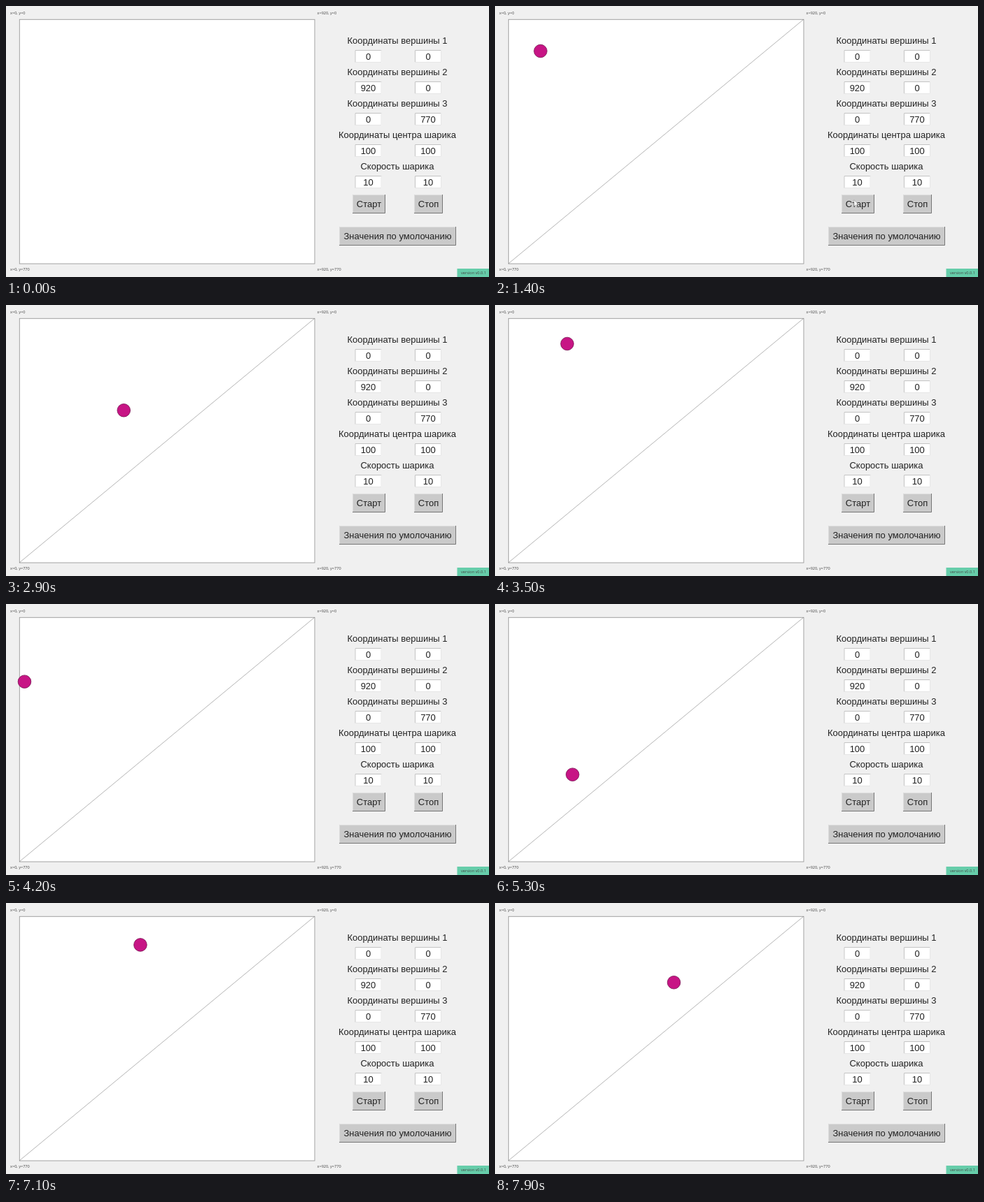
Write an HTML page that moves like this. It is 690x388 px and loops after 8000 ms.

```html
<!DOCTYPE html>
<html lang="ru">
<head>
<meta charset="utf-8">
<style>
  html, body { margin: 0; width: 100%; height: 100%; overflow: hidden; background: #f0f0f0; }
  svg { display: block; }
  text { font: 13px "Liberation Sans", Arial, sans-serif; fill: #222; text-anchor: middle; }
  .small { font: 5.6px "Open Sans", sans-serif; fill: #444; text-anchor: start; }
</style>
</head>
<body>
<svg width="690" height="388" viewBox="0 0 690 388">
  <rect width="690" height="388" fill="#f0f0f0"/>
  <rect x="19.3" y="19.3" width="421.7" height="349.7" fill="#fff" stroke="#999" stroke-width=".9"/>
  <g id="panel"></g>
  <rect x="644.5" y="376" width="46" height="12" fill="#66cdaa"/>
  <text class="small" x="650" y="384">version v0.0.1</text>
  <g id="scene">
    <path d="M441 19L19 369" stroke="#777" stroke-width=".55"/>
    <circle id="ball" r="9.3" fill="#c71585" stroke="#761050" stroke-width=".8"/>
  </g>
  <path id="cursor" d="M513 277.5v9l2-1.8 1.4 3 1.2-.6-1.3-2.8h2.4z" fill="#fff" stroke="#888" stroke-width=".5"/>
</svg>
<script>
const $ = id => document.getElementById(id);
const parts = [];
const text = (s, x, y, cls = "") => parts.push(`<text class="${cls}" x="${x}" y="${y}">${s}</text>`);

// Bevelled box: fill, then top-left and bottom-right edges
function box(x, y, w, h, fill, topLeft, bottomRight) {
  parts.push(`<rect x="${x}" y="${y}" width="${w}" height="${h}" fill="${fill}"/>
    <path d="M${x + .5} ${y + h}V${y + .5}H${x + w}" fill="none" stroke="${topLeft}"/>
    <path d="M${x} ${y + h - .5}H${x + w - .5}V${y}" fill="none" stroke="${bottomRight}"/>`);
}

function button(label, x, y, w) {
  box(x, y, w, 27, "#cacaca", "#dedede", "#777");
  text(label, x + w / 2, y + 18);
}

[
  ["Координаты вершины 1", 0, 0],
  ["Координаты вершины 2", 920, 0],
  ["Координаты вершины 3", 0, 770],
  ["Координаты центра шарика", 100, 100],
  ["Скорость шарика", 10, 10],
].forEach(([label, ...values], row) => {
  const y = 45 * row;
  text(label, 559, y + 54);
  values.forEach((value, column) => {
    const x = 517.5 + 85.5 * column;
    box(x - 19, y + 63, 38, 18, "#fff", "#c4c4c4", "#e6e6e6");
    text(value, x, y + 76.5);
  });
});

button("Старт", 495, 270, 47);
button("Стоп", 583, 270, 41);
button("Значения по умолочанию", 476, 316, 167);

for (const [px, x] of [[6, 0], [444.5, 920]])
  for (const [py, y] of [[12, 0], [379, 770]]) text(`x=${x}, y=${y}`, px, py, "small");

$("panel").innerHTML = parts.join("");

// Each wall: inward unit normal, and the offset at which the ball's centre turns
const slant = Math.hypot(350, 422);
const nx = -350 / slant, ny = -422 / slant;
const walls = [
  [1, 0, 26.3],
  [0, 1, 27],
  [nx, ny, nx * 441 + ny * 19 + 8.2],
];

// Follow the bouncing ball along its path for the given distance
function ballAt(distance) {
  let x = 65, y = 64.5, vx = 1, vy = 1;
  for (;;) {
    let reach = distance, hit = null;
    for (const wall of walls) {
      const [a, b, offset] = wall;
      const approach = -(vx * a + vy * b);
      const gap = (x * a + y * b - offset) / approach;
      if (approach > 1e-6 && gap < reach) { reach = gap; hit = wall; }
    }
    x += vx * reach;
    y += vy * reach;
    if (!hit) return [x, y];
    distance -= reach;
    const [a, b] = hit, k = 2 * (vx * a + vy * b);
    vx -= k * a;
    vy -= k * b;
  }
}

// The ball gathers a little speed at first
const travelled = t => .139 * t - 26 * (1 - Math.exp(-t / 700));

const start = performance.now();
function draw() {
  // The picture advances in steps of 100 ms
  const t = Math.floor((performance.now() - start) % 8000 / 100) * 100;
  const running = t >= 1400;
  $("scene").style.display = running ? "" : "none";
  $("cursor").style.display = running && t < 2300 ? "" : "none";
  if (running) {
    const [x, y] = ballAt(travelled(t - 1400));
    $("ball").setAttribute("transform", `translate(${x} ${y})`);
  }
  requestAnimationFrame(draw);
}
draw();
</script>
</body>
</html>
```
